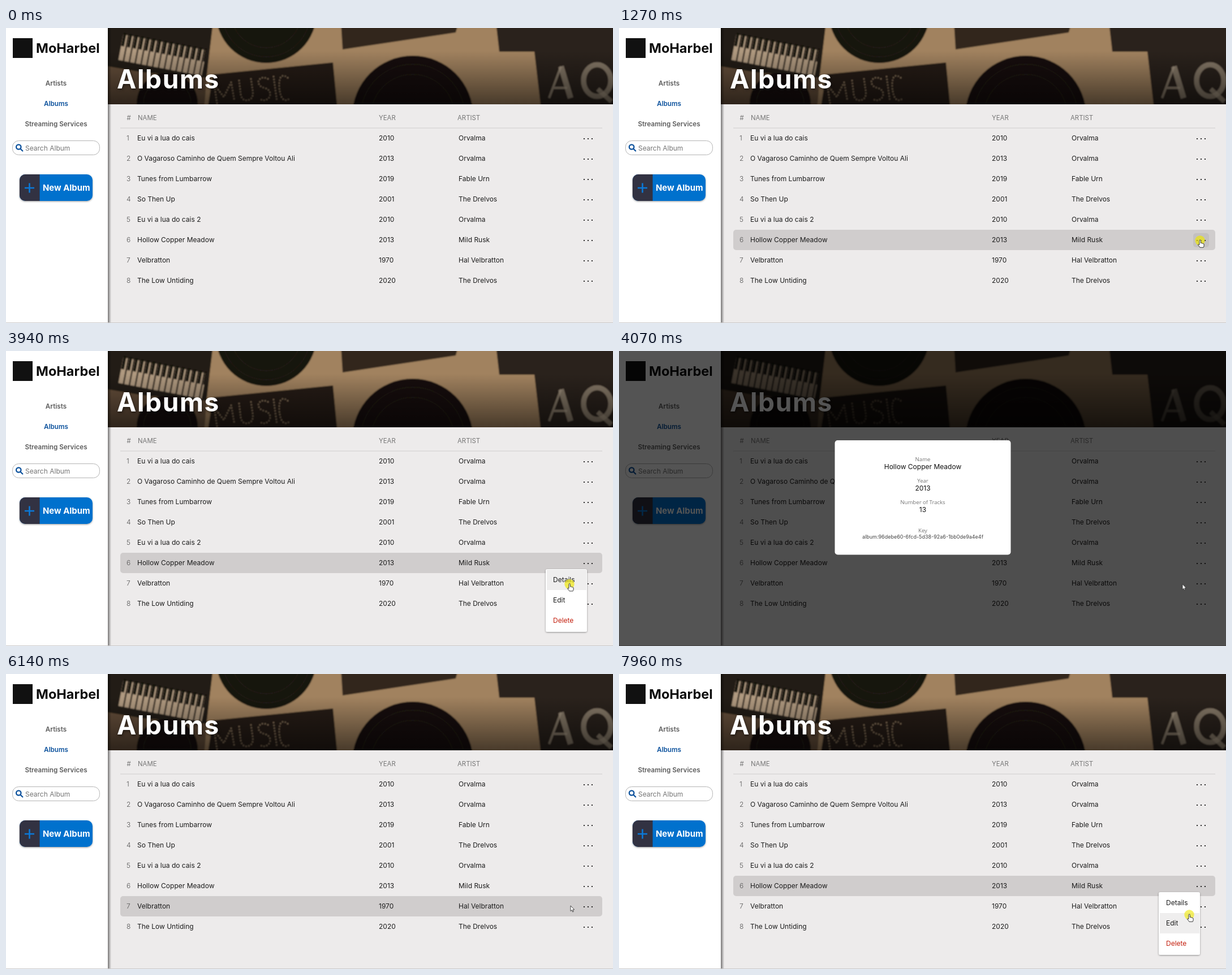
An HTML page that plays this animation: 1073 by 522 pixels, repeating every 8 s.

```html
<!DOCTYPE html>
<html lang="en">
<head>
<meta charset="utf-8">
<title>Albums</title>
<style>
html, body { margin: 0; width: 100%; height: 100%; overflow: hidden; background: #edebeb; }
svg { display: block; width: 1073px; height: 522px; }
text { font: 400 12px Inter, "Open Sans", sans-serif; fill: #1c1c1c; }
.nav text { font-size: 11.7px; font-weight: 600; fill: #5c5c5c; text-anchor: middle; }
.nav .active { fill: #0b519c; }
.brand { font-size: 23.5px; font-weight: 700; fill: #0c0c0c; }
.hint { fill: #757575; }
.cta { font-size: 14.9px; font-weight: 700; fill: #fff; }
.title {
  font-size: 46px; font-weight: 700; letter-spacing: .035em; fill: #fff;
  filter: drop-shadow(1px 2px 2px rgba(0, 0, 0, .5));
}
.head text { font-size: 11.4px; fill: #777; }
.num { font-weight: 300; fill: #555; }
.delete { fill: #c4200f; }
.modal text { text-anchor: middle; fill: #111; }
.modal .label { font: 400 9.6px "Open Sans", "Noto Sans", sans-serif; fill: #757575; }
.modal .key { font-size: 9px; fill: #444; }

/* hard switches */
.sw { opacity: 0; animation: 8s step-end infinite; }
.row6 { animation-name: row6; }
.row7 { animation-name: row7; }
.row8 { animation-name: row8; }
.more { animation-name: more; }
.menu { animation-name: menu; }
.details { animation-name: details; }
.edit { animation-name: edit; }
.modal { animation-name: modal; }
.hand { animation-name: hand; }
.arrow { animation-name: arrow; }
.ring { animation-name: ring; }
.full { animation-name: full; }
.up { animation: up 8s step-end infinite; }
.down { animation: down 8s step-end infinite; }
/* continuous motion */
.cursor { animation: cursor 8s linear infinite; }

@keyframes row8 { 0% { opacity: 0 } 2.7% { opacity: 1 } 3.57%, 100% { opacity: 0 } }
@keyframes row7 {
  0% { opacity: 0 } 3.57% { opacity: 1 } 4.6% { opacity: 0 }
  76.75% { opacity: 1 } 80.4%, 100% { opacity: 0 }
}
@keyframes row6 {
  0% { opacity: 0 } 4.6% { opacity: 1 } 50.875% { opacity: 0 } 80.4%, 100% { opacity: 1 }
}
@keyframes more {
  0% { opacity: 0 } 5% { opacity: 1 } 21.625% { opacity: 0 }
  81% { opacity: 1 } 92.9%, 100% { opacity: 0 }
}
@keyframes menu {
  0% { opacity: 0 } 17.5% { opacity: 1 } 50.875% { opacity: 0 } 91.375%, 100% { opacity: 1 }
}
@keyframes details {
  0% { opacity: 0 } 22.8% { opacity: 1 } 41.3% { opacity: 0 } 47.1% { opacity: 1 }
  50.875% { opacity: 0 } 93.5% { opacity: 1 } 96.1%, 100% { opacity: 0 }
}
@keyframes edit {
  0% { opacity: 0 } 41.3% { opacity: 1 } 47.1% { opacity: 0 } 96.1%, 100% { opacity: 1 }
}
@keyframes modal { 0% { opacity: 0 } 50.875% { opacity: 1 } 76.75%, 100% { opacity: 0 } }
@keyframes hand {
  0% { opacity: 0 } 5% { opacity: 1 } 50.875% { opacity: 0 } 81%, 100% { opacity: 1 }
}
@keyframes arrow {
  0% { opacity: 1 } 5% { opacity: 0 } 50.875% { opacity: 1 } 81%, 100% { opacity: 0 }
}
@keyframes ring {
  0% { opacity: 0 } 15.875% { opacity: .66 } 17.5% { opacity: 0 }
  49.25% { opacity: .66 } 50.875% { opacity: 0 } 74.25% { opacity: .66 } 76.75% { opacity: 0 }
  90.125% { opacity: .66 } 91.375% { opacity: 0 } 99.5%, 100% { opacity: .6 }
}
@keyframes full { 0% { opacity: 0 } 58.375%, 100% { opacity: 1 } }
@keyframes up { 0% { transform: none } 58.375%, 100% { transform: translateY(-19px) } }
@keyframes down { 0% { transform: none } 58.375%, 100% { transform: translateY(19px) } }
@keyframes cursor {
  0%, 1.87% { transform: translate(1008px, 540px) }
  1.875% { transform: translate(1012px, 505px) }
  3% { transform: translate(1019px, 450px) }
  4.5% { transform: translate(1025px, 395px) }
  6%, 21.625% { transform: translate(1027px, 376px) }
  24.25%, 40.125% { transform: translate(1009px, 403px) }
  42.625%, 45.875% { transform: translate(1002px, 433px) }
  48.125%, 76.74% { transform: translate(996px, 412.5px) }
  76.75%, 77.5% { transform: translate(998px, 410px) }
  79.5% { transform: translate(1006px, 400px) }
  82% { transform: translate(1022px, 380px) }
  84.25%, 92.5% { transform: translate(1028px, 374px) }
  96.375%, 100% { transform: translate(1008px, 426px) }
}
</style>
</head>
<body>
<svg viewBox="0 0 1073 522">
  <defs>
    <clipPath id="banner"><rect x="180" width="893" height="135"/></clipPath>
    <clipPath id="pill"><rect x="24" y="259" width="129" height="47" rx="10"/></clipPath>
    <linearGradient id="fade" x2="0" y2="1">
      <stop offset=".3" stop-opacity="0"/><stop offset="1" stop-opacity=".55"/>
    </linearGradient>
    <linearGradient id="edge">
      <stop stop-opacity=".5"/><stop offset="1" stop-opacity="0"/>
    </linearGradient>
    <filter id="soft"><feGaussianBlur stdDeviation=".8"/></filter>
    <filter id="shade" x="-20%" y="-20%" width="140%" height="140%">
      <feDropShadow dx="0" dy="1" stdDeviation="1.6" flood-opacity=".4"/>
    </filter>
  </defs>

  <rect width="1073" height="522" fill="#edebeb"/>

  <g clip-path="url(#banner)">
    <g filter="url(#soft)">
      <rect x="170" y="-10" width="920" height="160" fill="#a1825f"/>
      <path d="M170-10H366L352 108 330 145H170Z" fill="#211a14"/>
      <path d="M170 66 240 78 355 88 350 145H170Z" fill="#66503a"/>
      <path d="M203 34 350 62" stroke="#b09a80" stroke-width="46" stroke-dasharray="8 2.5"/>
      <path d="M206 20 353 48" stroke="#19130f" stroke-width="24" stroke-dasharray="5 5.500"/>
      <circle cx="285" cy="133" r="54" fill="#14110e"/>
      <circle cx="460" cy="-27" r="89" fill="#17130f"/>
      <path d="M366 82 578 61 586 145H356Z" fill="#261e18"/>
      <path d="M592-10H800L795 8 595 38Z" fill="#33281f"/>
      <path d="M866-10H1090V145H946L934 42 872 42Z" fill="#2b221b"/>
      <circle cx="719" cy="156" r="107" fill="#14100d"/>
      <g fill="none" stroke="#3a2f26" stroke-opacity=".6">
        <circle cx="460" cy="-27" r="78"/><circle cx="460" cy="-27" r="62"/>
        <circle cx="719" cy="156" r="92"/><circle cx="719" cy="156" r="74"/>
        <circle cx="285" cy="133" r="42"/>
      </g>
      <g fill="none" stroke="#a48a6d" stroke-width="2.4" stroke-linecap="round" stroke-dasharray="0 5">
        <path d="M373 133 368 100 385 122 398 96 404 130"/>
        <path d="M412 93 415 118Q418 131 430 127 438 124 436 110L433 90"/>
        <path d="M463 90Q450 84 446 95 447 104 457 106 470 110 466 122 458 132 448 125"/>
        <path d="M473 86 479 130"/>
        <path d="M498 88Q482 76 483 105 486 134 500 126"/>
      </g>
      <g fill="none" stroke="#a2937f" stroke-opacity=".75">
        <path d="M960 124 981 68M968 106H992" stroke-width="4"/>
        <path d="M981 68 998 124" stroke-width="10"/>
        <ellipse cx="1045" cy="93" rx="24" ry="28" stroke-width="9"/>
        <path d="M1046 108 1070 130" stroke-width="8"/>
      </g>
    </g>
    <rect x="180" width="893" height="135" fill="url(#fade)"/>
  </g>
  <text class="title" x="196" y="107">Albums</text>

  <g class="head">
    <text x="213.500" y="163">#</text><text x="233" y="163">NAME</text>
    <text x="659" y="163">YEAR</text><text x="798" y="163">ARTIST</text>
  </g>
  <path d="M202 177H1054" stroke="#cfcdcd"/>
  <g id="rows"></g>

  <rect x="180" width="6" height="522" fill="url(#edge)"/>
  <rect width="180" height="522" fill="#fff"/>
  <rect x="12" y="18" width="35" height="35" fill="#111"/>
  <text class="brand" x="53" y="44">MoHarbel</text>
  <g class="nav">
    <text x="88.500" y="102">Artists</text>
    <text x="88.500" y="138" class="active">Albums</text>
    <text x="88.500" y="174">Streaming Services</text>
  </g>
  <rect x="11.500" y="199.500" width="154" height="25" rx="11" fill="#fff" stroke="#b4b4b4"/>
  <g fill="none" stroke="#0b519c" stroke-width="2.300" stroke-linecap="round">
    <circle cx="22.300" cy="210.500" r="4.200"/><path d="M25.700 214 29.300 217.500"/>
  </g>
  <text class="hint" x="34" y="216.500">Search Album</text>
  <g filter="url(#shade)">
    <g clip-path="url(#pill)">
      <rect x="24" y="259" width="129" height="47" fill="#0071cd"/>
      <rect x="24" y="259" width="35.500" height="47" fill="#323142"/>
    </g>
  </g>
  <path d="M33 283H50M41.500 274.500V291.500" stroke="#0b79d8" stroke-width="2.600"/>
  <text class="cta" x="65" y="288">New Album</text>
  <rect y="521" width="1073" height="1" fill="#cbc9c9"/>

  <g class="sw menu">
    <rect x="954" y="386" width="73" height="111" rx="3" fill="#fff" filter="url(#shade)"/>
    <rect class="sw details" x="956" y="387" width="70" height="36" fill="#efeeee"/>
    <rect class="sw edit" x="956" y="423" width="70" height="36" fill="#efeeee"/>
    <text x="967" y="409">Details</text>
    <text x="967" y="445">Edit</text>
    <text x="967" y="481" class="delete">Delete</text>
  </g>

  <g class="sw modal">
    <rect width="1073" height="522" fill-opacity=".67"/>
    <rect x="381.500" y="158" width="311" height="202.500" rx="5" fill="#fff"/>
    <rect class="sw full" x="381.500" y="139" width="311" height="240.500" rx="5" fill="#fff"/>
    <g class="up">
      <text class="label" x="537" y="194.500">Name</text><text x="537" y="208.500">Hollow Copper Meadow</text>
      <text class="label" x="537" y="232.500">Year</text><text x="537" y="246.500">2013</text>
      <text class="label" x="537" y="271">Number of Tracks</text><text x="537" y="284.500">13</text>
    </g>
    <g class="sw full">
      <text class="label" x="537" y="290">Artist</text><text x="537" y="304">Mild Rusk</text>
    </g>
    <g class="down">
      <text class="label" x="537" y="320.500">Key</text>
      <text class="key" x="537" y="332">album:96debe60-6fcd-5d38-92a6-1bb0de9a4e4f</text>
    </g>
  </g>

  <g class="cursor">
    <circle class="sw ring" r="8.700" fill="#f0e800"/>
    <path class="sw arrow" d="M0 0V9.600L2.200 7.600 3.700 11 5.200 10.400 3.800 7H6.700Z" fill="#fff" stroke="#222" stroke-width=".8"/>
    <path class="sw hand" d="M-1 7V.3a1.200 1.200 0 0 1 2.400 0V4.500q2-.6 2.300.5 1.800-.3 2 .7 1.400-.1 1.400 1.200V9q0 1.800-1 3.300H0Q-1.500 10-3.600 7.800-3.400 6.300-1 7.600Z" fill="#fff" stroke="#222" stroke-width=".9"/>
  </g>
</svg>
<script>
const albums = [
  ["Eu vi a lua do cais", 2010, "Orvalma"],
  ["O Vagaroso Caminho de Quem Sempre Voltou Ali", 2013, "Orvalma"],
  ["Tunes from Lumbarrow", 2019, "Fable Urn"],
  ["So Then Up", 2001, "The Drelvos"],
  ["Eu vi a lua do cais 2", 2010, "Orvalma"],
  ["Hollow Copper Meadow", 2013, "Mild Rusk"],
  ["Velbratton", 1970, "Hal Velbratton"],
  ["The Low Untiding", 2020, "The Drelvos"]
];

const cell = (x, y, value, cls = "") => `<text x="${x}" y="${y}" class="${cls}">${value}</text>`;

function row([name, year, artist], i) {
  const mid = 195 + 36 * i, base = mid + 4.4;
  const dots = [1022, 1029, 1036].map(x => `<circle cx="${x}" cy="${mid + 1}" r="1.1"/>`).join("");
  const hover = i < 5 ? "" :
    `<rect class="sw row${i + 1}" x="202" y="${mid - 18}" width="852" height="36" rx="5" fill="#d0cdcd"/>`;
  const more = i !== 5 ? "" :
    `<rect class="sw more" x="1015" y="${mid - 12}" width="28" height="25" rx="5" fill="#c3c0c0"/>`;
  return hover + more + cell(213, base, i + 1, "num") + cell(232, base, name) +
    cell(659, base, year) + cell(800, base, artist) + dots;
}

document.getElementById("rows").innerHTML = albums.map(row).join("");
</script>
</body>
</html>
```
